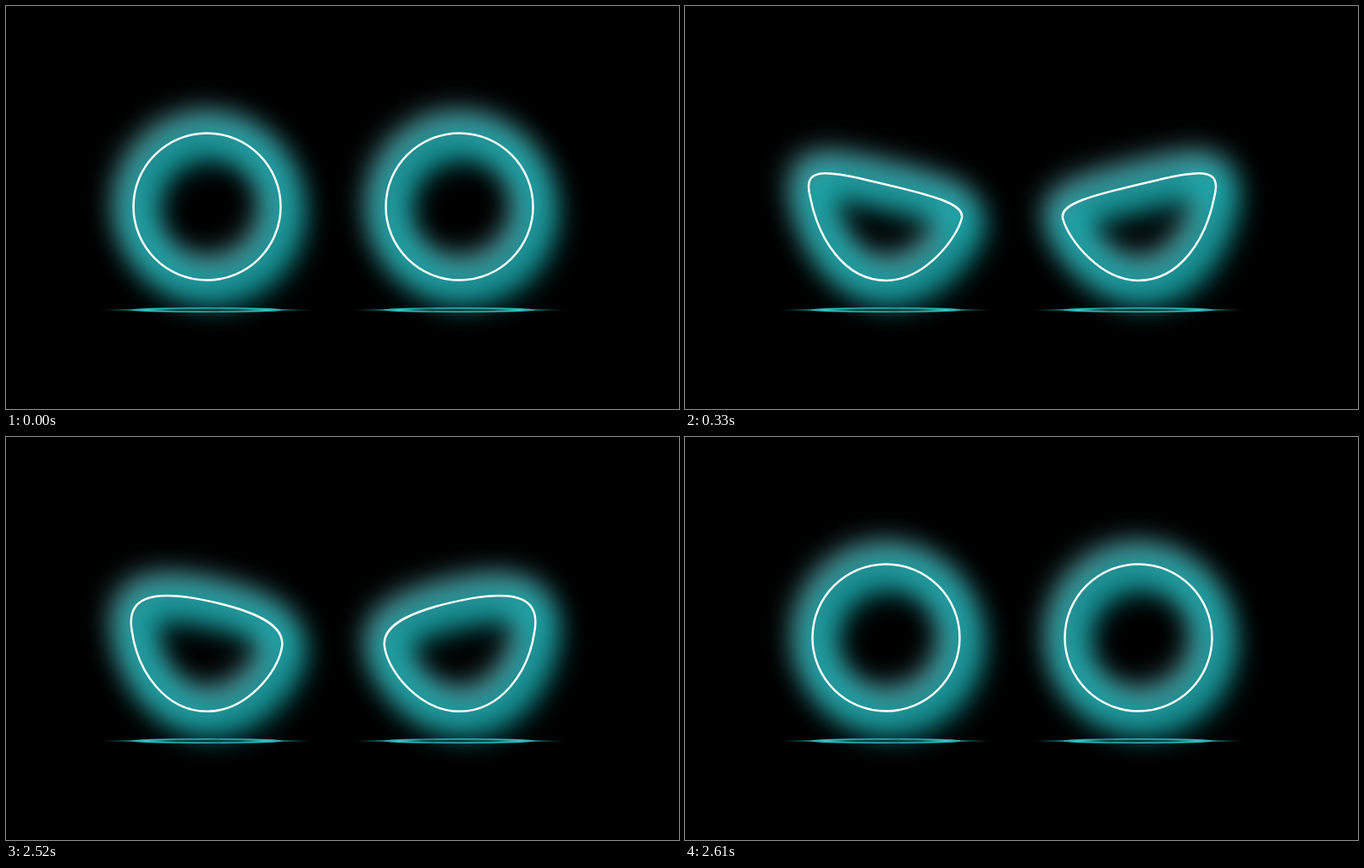
An HTML page that plays this animation: 800 by 480 pixels, repeating every 2970 ms.

```html
<!DOCTYPE html>
<html lang="en">
<head>
<meta charset="utf-8">
<title>Glowing eyes</title>
<style>
  html, body { margin: 0; width: 100%; height: 100%; overflow: hidden; background: #000; }
  svg { display: block; width: 100%; height: 100%; }
  .eyes path { fill: none; stroke-linejoin: round; }
  .glow { stroke-width: 35; }
  .line { stroke: #fff; stroke-width: 2.5; }
</style>
</head>
<body>
<svg viewBox="0 0 800 480">
  <defs>
    <filter id="blur" filterUnits="userSpaceOnUse" x="0" y="0" width="800" height="480" color-interpolation-filters="sRGB">
      <feGaussianBlur stdDeviation="18"/>
    </filter>
    <linearGradient id="streak">
      <stop offset="0" stop-color="#1c9a9c" stop-opacity="0"/>
      <stop offset=".12" stop-color="#1c9a9c" stop-opacity=".55"/>
      <stop offset=".22" stop-color="#40d0d2"/>
      <stop offset=".36" stop-color="#1c9a9c" stop-opacity=".35"/>
      <stop offset=".5" stop-color="#1c9a9c" stop-opacity=".1"/>
      <stop offset=".64" stop-color="#1c9a9c" stop-opacity=".35"/>
      <stop offset=".78" stop-color="#40d0d2"/>
      <stop offset=".88" stop-color="#1c9a9c" stop-opacity=".55"/>
      <stop offset="1" stop-color="#1c9a9c" stop-opacity="0"/>
    </linearGradient>
    <g id="floor">
      <ellipse rx="128" ry="1.5" fill="url(#streak)"/>
      <ellipse rx="88" ry="2.2" fill="none" stroke="#2fb4b7" stroke-width="1.4"/>
    </g>
  </defs>
  <rect width="800" height="480"/>
  <g class="eyes">
    <g filter="url(#blur)" opacity=".9"><path class="glow" stroke="#69b4ba" transform="translate(-3 -7)"/></g>
    <g filter="url(#blur)" opacity=".82"><path class="glow" stroke="#0ab9bc" transform="translate(8 10)"/></g>
    <path class="line"/>
  </g>
  <use href="#floor" x="238.5" y="362"/>
  <use href="#floor" x="538.5" y="362"/>
</svg>
<script>
const LOOP = 2970, STEP = 30, MIRROR = 778;
const paths = document.querySelectorAll('.eyes path');

// Closed outlines: start point, then three points per cubic curve.
const round = (() => {
  const c = 239, r = 87.5, k = r * 0.5523;
  return [
    [c - r, c],
    [c - r, c - k], [c - k, c - r], [c, c - r],
    [c + k, c - r], [c + r, c - k], [c + r, c],
    [c + r, c + k], [c + k, c + r], [c, c + r],
    [c - k, c + r], [c - r, c + k], [c - r, c]
  ];
})();
const angry = [
  [148.5, 226],
  [136.5, 191], [161, 205], [215, 219.2],
  [300, 241], [336, 245], [329, 257],
  [322, 275], [284, 327], [239, 327],
  [189, 327], [160, 275], [148.5, 226]
];

const clamp = v => Math.min(1, Math.max(0, v));
const outline = ([start, ...rest]) => `M${start}C${rest.join(' ')}Z`;

// Squint amount: closes over six steps, opens over five.
function squint(ms) {
  const k = Math.floor(ms / STEP);
  return Math.min(clamp((k - 6) / 6), clamp((87 - k) / 5));
}

let shown = -1;
function draw(u) {
  if (u === shown) return;
  shown = u;
  const left = round.map(([x, y], i) => [
    x + (angry[i][0] - x) * u,
    y + (angry[i][1] - y) * u
  ]);
  const right = left.map(([x, y]) => [MIRROR - x, y]);
  const d = outline(left) + outline(right);
  paths.forEach(p => p.setAttribute('d', d));
}

const begin = performance.now();
function tick() {
  draw(squint((performance.now() - begin) % LOOP));
  requestAnimationFrame(tick);
}
tick();
</script>
</body>
</html>
```
